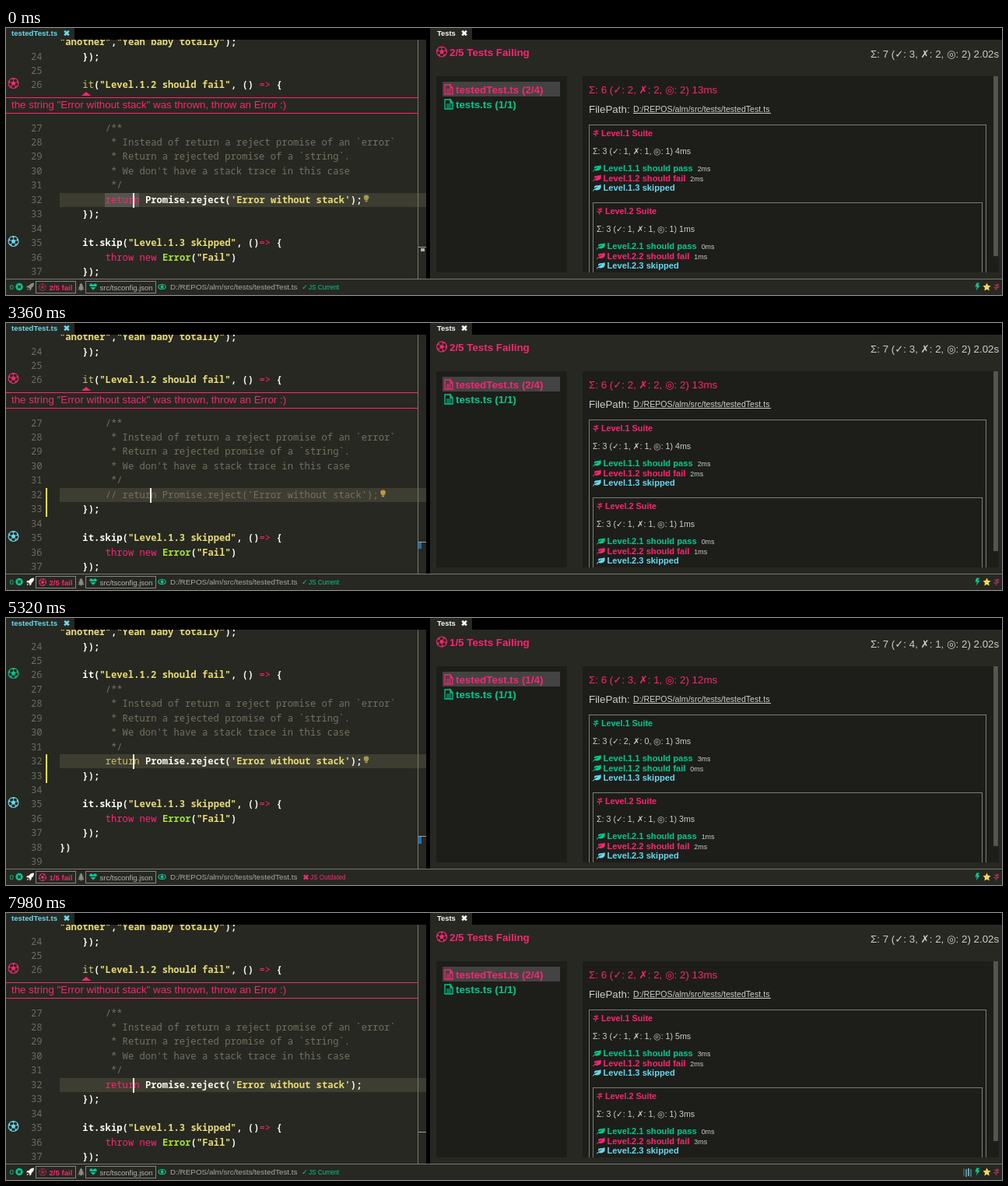
Write an HTML page with a canvas that moves like this. It is 1280 px wide and 343 px high and loops after 8050 ms.

```html
<!DOCTYPE html>
<html lang="en">
<head>
<meta charset="utf-8">
<title>Live test run</title>
<style>
html, body { margin: 0; width: 100%; height: 100%; overflow: hidden; background: #272822; }
canvas { display: block; }
</style>
</head>
<body>
<canvas id="stage" width="1280" height="343"></canvas>
<script>
const ctx = document.getElementById('stage').getContext('2d');
const LOOP = 8050, FADE = 490, CHAR = 7.33, ROW = 18.45;
const SANS = '"Liberation Sans", Arial, "DejaVu Sans", sans-serif';
const MONO = '"Noto Sans Mono", "DejaVu Sans Mono", monospace';
const BG = '#272822', PANEL = '#1d1e1a', WHITE = '#f8f8f2', LIGHT = '#cccccc', GREY = '#8a8a86';
const PINK = '#f92672', GREEN = '#00c990', CYAN = '#66d9ef', YELLOW = '#e6db74', DIM = '#75715e';
const INK = { w: WHITE, s: YELLOW, k: PINK, c: DIM, g: '#a6e22e', y: '#c9c46c' };

// moments of the story
const COMMENT = 1400, SAVE1 = 2240, RUN1 = 2590, DONE1 = 3850, CLOSE = 3920;
const RESTORE = 4130, SAVE2 = 4760, RUN2 = 5180, DONE2 = 6720, OPEN = 7000;
const BLINKS = [210, 630, 1050, 1400, 1890, 2310, 2730, 3150, 3570, 3990, 4550, 4970,
  5390, 5810, 6230, 6650, 7420, 7840];
const STATUS = [[-FADE, 1], [COMMENT, 0], [2870, 1], [RESTORE, 0], [5880, 1]];
const BUSY = [[2200, 2600], [CLOSE, 4130], [SAVE2, 5180], [5600, 5880], [OPEN, 7140], [7700, LOOP]];

// total, file, file time, suite 1 with its times, suite 2 times
const RESULTS = [
  ['3, ✗: 2', '2, ✗: 2', '13ms', '1, ✗: 1', '4ms', '2ms', '2ms', '1ms', '0ms', '1ms'],
  ['4, ✗: 1', '3, ✗: 1', '12ms', '2, ✗: 0', '3ms', '3ms', '0ms', '3ms', '1ms', '2ms'],
  ['3, ✗: 2', '2, ✗: 2', '13ms', '1, ✗: 1', '5ms', '3ms', '2ms', '3ms', '0ms', '3ms']
];

// icons on a 16 unit grid
const ICON = {
  leaf: 'M0 14Q1 11 4 10Q8 8 11 7Q7 7 3 9Q2 4 8 4Q13 4 15 2Q18 12 8 13Q5 13 3 12L1 15Z',
  sprout: 'M6 16Q8 8 9 0H10Q10 8 8 16ZM8 12Q3 13 1 9Q6 7 8 12ZM8 11Q12 12 15 8Q10 6 8 11Z' +
    'M9 7Q5 7 3 3Q8 2 9 7ZM9 6Q13 6 14 2Q10 1 9 6Z',
  rocket: 'M16 0Q9 0 6 5L2 6L0 9L4 9L7 12L7 16L10 14L11 10Q16 7 16 0ZM3 11L1 15L5 13Z',
  tree: 'M8 0L12 5H10L14 10H11L15 14H9.5V16H6.5V14H1L5 10H2L6 5H4Z',
  heart: 'M8 15L1 8Q-2 2 4 1Q7 1 8 4Q9 1 12 1Q18 2 15 8Z',
  bolt: 'M6 0H12L9 5H13L5 16L7 8H3Z',
  star: 'M8 0L10.5 5L16 6L12 10L13 16L8 13L3 16L4 10L0 6L5.5 5Z',
  bulb: 'M8 0Q14 0 14 6Q13 9 11 12H5Q3 9 2 6Q2 0 8 0ZM5 13H11V15L8 16L5 15Z',
  cross: 'M4 0L8 4L12 0L16 4L12 8L16 12L12 16L8 12L4 16L0 12L4 8L0 4Z'
};
for (const k in ICON) ICON[k] = new Path2D(ICON[k]);

const between = (t, a, b) => t >= a && t < b;
const clamp = v => Math.max(0, Math.min(1, v));
const mix = (a, b, p) => {
  const part = (c, i) => parseInt(c.slice(i, i + 2), 16);
  return `rgb(${[1, 3, 5].map(i => Math.round(part(a, i) + (part(b, i) - part(a, i)) * p))})`;
};

function rect(x, y, w, h, color) {
  ctx.fillStyle = color;
  ctx.fillRect(x, y, w, h);
}
function frame(x, y, w, h, color = '#7b7b77') {
  ctx.strokeStyle = color;
  ctx.lineWidth = 1;
  ctx.strokeRect(x + .5, y + .5, w, h);
}
function text(s, x, y, color, size, weight = 'normal', font = SANS) {
  ctx.font = `${weight} ${size}px ${font}`;
  ctx.fillStyle = color;
  ctx.fillText(s, x, y);
}
function icon(name, x, y, size, color) {
  ctx.save();
  ctx.translate(x - size / 2, y - size / 2);
  ctx.scale(size / 16, size / 16);
  ctx.fillStyle = color;
  ctx.fill(ICON[name]);
  ctx.restore();
}
function circle(x, y, r, color, width) {
  ctx.beginPath();
  ctx.arc(x, y, r, 0, 7);
  ctx.strokeStyle = ctx.fillStyle = color;
  ctx.lineWidth = width;
  width ? ctx.stroke() : ctx.fill();
}
function ball(x, y, r, color, turn = 0) {
  ctx.save();
  ctx.translate(x, y);
  ctx.rotate(turn);
  circle(0, 0, r * .92, color, r * .16);
  ctx.lineWidth = r * .11;
  ctx.beginPath();
  for (let i = 0; i < 5; i++) {
    const a = i * Math.PI * .4 - Math.PI / 2;
    ctx.lineTo(Math.cos(a) * r * .42, Math.sin(a) * r * .42);
  }
  ctx.fill();
  for (let i = 0; i < 5; i++) {
    ctx.beginPath();
    ctx.moveTo(0, -r * .4);
    ctx.lineTo(0, -r * .7);
    ctx.stroke();
    ctx.beginPath();
    ctx.moveTo(-r * .36, -r * .9);
    ctx.lineTo(0, -r * .6);
    ctx.lineTo(r * .36, -r * .9);
    ctx.fill();
    ctx.rotate(Math.PI * .4);
  }
  ctx.restore();
}
function page(x, y, color) {
  ctx.strokeStyle = color;
  ctx.lineWidth = 1.3;
  ctx.beginPath();
  ctx.moveTo(x + 7, y);
  ctx.lineTo(x, y);
  ctx.lineTo(x, y + 12);
  ctx.lineTo(x + 10, y + 12);
  ctx.lineTo(x + 10, y + 4);
  ctx.lineTo(x + 7, y);
  ctx.lineTo(x + 7, y + 4);
  ctx.lineTo(x + 10, y + 4);
  ctx.stroke();
  for (const dy of [5.5, 7.5, 9.5]) rect(x + 2, y + dy, 6, 1, color);
}

function editor(t) {
  const failing = !between(t, CLOSE, OPEN);
  const commented = between(t, COMMENT, RESTORE);
  const rowY = n => Math.round(36.5 + ROW * (n - 24) + (failing && n > 26 ? 36.7 : 0));
  const line = (n, col, ...parts) => {
    let x = 69 + col * CHAR;
    for (const p of parts) {
      const s = p.slice(1);
      text(s, x, rowY(n) + 4, INK[p[0]], 12.2, 'wsg'.includes(p[0]) ? 'bold' : 'normal', MONO);
      x += s.length * CHAR;
    }
  };

  ctx.save();
  ctx.beginPath();
  ctx.rect(0, 15, 540, 307);
  ctx.clip();
  const y32 = rowY(32);
  rect(69, y32 - 9, 471, 18, '#3e3d32');
  if (t < COMMENT) rect(127, y32 - 9, 44, 18, '#55554d');

  line(23, 0, 's"another"', 'w,', 's"Yeah baby totally"', 'w);');
  line(24, 4, 'w});');
  line(26, 4, failing ? 'yit' : 'wit', 'w(', 's"Level.1.2 should fail"', 'w, () ', 'k=>', 'w {');
  ['/**', ' * Instead of return a reject promise of an `error`',
    ' * Return a rejected promise of a `string`.',
    " * We don't have a stack trace in this case", ' */'
  ].forEach((s, i) => line(27 + i, 8, 'c' + s));
  if (commented) line(32, 8, "c// return Promise.reject('Error without stack');");
  else line(32, 8, (failing ? 'k' : 'y') + 'return', 'w Promise.reject(', "s'Error without stack'", 'w);');
  line(33, 4, 'w});');
  line(35, 4, 'wit.skip(', 's"Level.1.3 skipped"', 'w, ()', 'k=>', 'w {');
  line(36, 8, 'kthrow new ', 'gError', 'w(', 's"Fail"', 'w)');
  line(37, 4, 'w});');
  line(38, 0, 'w})');
  for (let n = 24; n < 40; n++) text(n, 32, rowY(n) + 4, '#6d6c60', 12.2, 'normal', MONO);

  if (between(t, 2660, 6300)) rect(51, y32 - 9, 2, 37, '#f5e83a');
  if (BLINKS.filter(b => b <= t).length % 2 === 0) rect(commented ? 185 : 163, y32 - 9, 2, 19, WHITE);
  if (t < 7700) {
    const moved = between(t, 2800, RESTORE);
    icon('bulb', moved ? 484.5 : 463, y32 - 2, 9, moved || between(t, 5600, DONE2) ? '#c4973d' : '#a39a4c');
  }

  ball(9.5, rowY(26) - 2, 7, failing ? PINK : GREEN);
  ball(9.5, rowY(35) - 2, 7, CYAN);
  if (failing) {
    rect(0, 89, 530, 1, PINK);
    rect(0, 109, 530, 1, PINK);
    ctx.fillStyle = PINK;
    ctx.beginPath();
    ctx.moveTo(97, 87);
    ctx.lineTo(103, 82);
    ctx.lineTo(109, 87);
    ctx.fill();
    text('the string "Error without stack" was thrown, throw an Error :)', 7, 103, PINK, 13.33);
  }

  // overview ruler
  rect(529, 15, 1, 307, '#77776f');
  if (between(t, CLOSE, 5100)) {
    ctx.globalAlpha = clamp((5100 - t) / 500);
    rect(530, 235, 10, 46, '#45463f');
    ctx.globalAlpha = 1;
  }
  if (between(t, 2660, CLOSE) || between(t, SAVE2, 6300)) rect(530, 281, 4, 9, '#1f6fa8');
  rect(530, failing ? 281 : 280, 10, 1, '#a0a098');
  if (t < COMMENT) rect(533, 283, 5, 4, '#b0b0a8');
  ctx.restore();
}

function tabs(t) {
  rect(0, 0, 1280, 15, '#000');
  rect(0, 0, 88, 15, BG);
  rect(545, 0, 54, 15, BG);
  rect(540, 0, 5, 322, '#000');
  text('testedTest.ts', 7, 10, CYAN, 9.7, 'bold');
  text('Tests', 554, 10, WHITE, 9.4, 'bold');
  if (between(t, COMMENT, SAVE1) || between(t, RESTORE, SAVE2)) {
    circle(78, 6.5, 4.2, CYAN, 1.8);
    rect(73.5, 6, 9, 1, CYAN);
    rect(77.5, 2, 1, 9, CYAN);
  } else icon('cross', 78, 6.5, 7.5, CYAN);
  icon('cross', 589, 6.5, 7.5, WHITE);
}

function suite(n, x, y, width, counts, time, times, ok) {
  const color = ok ? GREEN : PINK;
  frame(x, y, width, 220);
  icon('sprout', x + 9, y + 11, 9, color);
  text(`Level.${n} Suite`, x + 16, y + 15, color, 10.8, 'bold');
  text(`Σ: 3 (✓: ${counts}, ◎: 1) ${time}`, x + 5, y + 38, LIGHT, 10.67);
  ['1 should pass', '2 should fail', '3 skipped'].forEach((s, i) => {
    const ink = [GREEN, color, CYAN][i], by = y + 60 + i * 12.5;
    icon('leaf', x + 10.5, by - 4, 11, ink);
    text(`Level.${n}.${s}`, x + 18.5, by, ink, 11.15, 'bold');
    if (times[i]) text(times[i], x + 24.5 + ctx.measureText(`Level.${n}.${s}`).width, by, LIGHT, 8.9);
  });
}

function report(r, fails, turn) {
  ball(560, 30.5, 7, PINK, turn);
  text(`${fails}/5 Tests Failing`, 570, 35.5, PINK, 13.33, 'bold');
  text(`Σ: 7 (✓: ${r[0]}, ◎: 2) 2.02s`, 1111, 38, LIGHT, 13.33);

  rect(553, 62, 168, 252, PANEL);
  rect(561, 69, 151, 19, '#434343');
  page(564, 73, PINK);
  text(`testedTest.ts (${fails}/4)`, 578, 84, PINK, 13.33, 'bold');
  page(564, 92, GREEN);
  text('tests.ts (1/1)', 578, 103, GREEN, 13.33, 'bold');

  rect(741, 62, 535, 252, PANEL);
  rect(1269, 62, 6, 231, '#55554f');
  ctx.save();
  ctx.beginPath();
  ctx.rect(741, 62, 535, 252);
  ctx.clip();
  text(`Σ: 6 (✓: ${r[1]}, ◎: 2) ${r[2]}`, 749, 84, PINK, 13.33);
  text('FilePath:', 749, 109, LIGHT, 13.33);
  text('D:/REPOS/alm/src/tests/testedTest.ts', 806, 108, LIGHT, 10.6);
  rect(806, 109, 177, 1, LIGHT);
  suite(1, 749, 124, 510, r[3], r[4], [r[5], r[6]], fails === 1);
  suite(2, 754, 224, 500, '1, ✗: 1', r[7], [r[8], r[9]], false);
  ctx.restore();
}

function statusBar(t, fails, running, turn) {
  rect(0, 322, 1280, 21, BG);
  rect(0, 322, 1280, 1, '#77776f');
  text('0', 4.5, 336, GREEN, 9.8);
  circle(17, 332.5, 4.7, GREEN);
  icon('cross', 17, 332.5, 4.5, BG);
  icon('rocket', 31, 332.5, 10, mix(GREY, WHITE, clamp((t - COMMENT) / FADE)));

  frame(38, 325, 51, 15, '#85857f');
  ball(47, 333, 5, running ? PINK : '#a52552', turn);
  text(`${fails}/5 fail`, 55.5, 336.5, PINK, 9.6, 'bold');
  icon('tree', 96.5, 332.5, 10, GREY);
  frame(102, 325, 90, 15, '#85857f');
  icon('heart', 112, 332.5, 9.5, GREEN);
  rect(107, 332, 10, 1, BG);
  text('src/tsconfig.json', 120.5, 336.5, '#b5b5b0', 9.5);

  ctx.beginPath();
  ctx.ellipse(200.5, 332.5, 4.7, 3, 0, 0, 7);
  ctx.strokeStyle = GREEN;
  ctx.lineWidth = 1.2;
  ctx.stroke();
  circle(200.5, 332.5, 1.9, GREEN);
  text('D:/REPOS/alm/src/tests/testedTest.ts', 211, 336, '#a9a9a4', 9.9);

  const [since, current] = STATUS.filter(s => s[0] <= t).pop();
  const ink = mix('#555555', current ? GREEN : PINK, clamp((t - since) / FADE));
  if (current) text('✓', 380, 336, ink, 9.5);
  else icon('cross', 385.5, 333, 7, ink);
  text(current ? 'JS Current' : 'JS Outdated', current ? 389 : 391, 336, ink, 8.2);

  const busy = BUSY.find(([a, b]) => between(t, a, b));
  if (busy) {
    ctx.globalAlpha = clamp((t - busy[0]) / 280);
    ['#38564f', '#5d8791', '#6da0aa', '#4b6d78'].forEach((c, i) => rect(1230 + i * 3, 328 + (i % 2), 2, 10, c));
    ctx.globalAlpha = 1;
  }
  icon('bolt', 1248.5, 332.5, 10, GREEN);
  icon('star', 1260.5, 332.5, 10, '#f0d956');
  icon('sprout', 1273, 332.5, 9, '#b8355f');
}

function draw(now) {
  const t = now % LOOP;
  const fails = between(t, DONE1, DONE2) ? 1 : 2;
  const start = between(t, RUN1, DONE1) ? RUN1 : between(t, RUN2, DONE2) ? RUN2 : 0;
  const turn = start ? (t - start) / 1700 * Math.PI * 2 : 0;
  rect(0, 0, 1280, 343, BG);
  editor(t);
  tabs(t);
  report(RESULTS[t < DONE1 ? 0 : t < DONE2 ? 1 : 2], fails, turn);
  statusBar(t, fails, start > 0, turn);
}

const begin = performance.now();
function tick() {
  draw(performance.now() - begin);
  requestAnimationFrame(tick);
}
tick();
</script>
</body>
</html>
```
